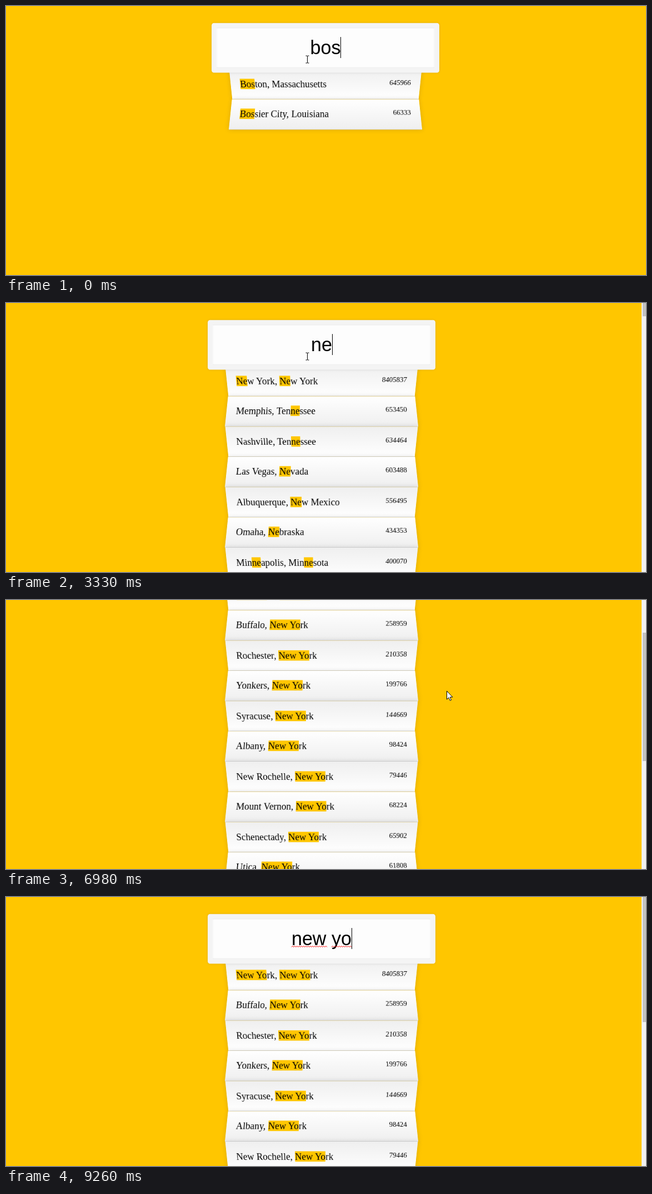
An HTML page for the animation above (9.51 s loop, 1152 px wide and 486 px high).

```html
<!DOCTYPE html>
<html lang="en">
<head>
<meta charset="utf-8">
<title>City search</title>
<style>
  html, body { margin: 0; width: 100%; height: 100%; overflow: hidden; background: #ffc600; }
  #stage { position: relative; width: 1152px; height: 486px; overflow: hidden; }
  #page { position: absolute; left: 0; top: 0; width: 0; transform-origin: 0 0; }
  #box {
    position: absolute; z-index: 2; left: -240px; top: 35.6px; width: 480px; height: 105px;
    box-sizing: border-box; border: 10px solid #f4f4f4; border-radius: 5px; padding: 20px;
    background: #fdfdfd; text-align: center; white-space: pre;
    font: 40px/45px "Liberation Sans", Arial, sans-serif;
    box-shadow: 0 0 5px rgba(0,0,0,.12), inset 0 0 2px rgba(0,0,0,.19);
  }
  #box.empty { color: #757575; }
  ul { position: absolute; left: -200px; top: 130.6px; width: 400px; margin: 0; padding: 0; }
  li {
    display: flex; justify-content: space-between; box-sizing: border-box; height: 64px; padding: 20px;
    border-bottom: 1px solid #d8d8d8; box-shadow: 0 0 10px rgba(0,0,0,.14);
    font: 20px/23px "Liberation Serif", "Times New Roman", serif; color: #000; white-space: nowrap;
  }
  li:nth-child(odd) {
    transform: perspective(100px) rotateX(-3deg) translateY(3px);
    background: linear-gradient(to top, #fff, #efefef);
  }
  li:nth-child(even) {
    transform: perspective(100px) rotateX(3deg) translateY(2px) scale(1.001);
    background: linear-gradient(to bottom, #fff, #efefef);
  }
  li b { font-weight: normal; background: #ffc600; }
  li i { font-style: normal; font-size: 15px; line-height: 17px; }
  #bar { position: absolute; left: 1144px; top: 0; width: 8px; height: 486px; background: #f1f1f1; }
  #thumb { position: absolute; left: 2px; top: 0; width: 6px; background: #c1c1c1; }
  svg { position: absolute; left: 0; top: 0; }
</style>
</head>
<body>
<div id="stage">
  <div id="page">
    <div id="box"><span id="text"></span></div>
    <ul id="list"></ul>
  </div>
  <div id="bar"><div id="thumb"></div></div>
  <svg width="1152" height="486">
    <g id="ink">
      <path id="wave" fill="none" stroke="#f00" stroke-width="1"/>
      <rect id="caret" y="56" width="1" height="38"/>
    </g>
    <path id="beam" fill="none" stroke="#000" d="M-3 -6.5h2.5l.5 .5 .5 -.5h2.5M-3 6.5h2.5l.5 -.5 .5 .5h2.5M0 -6v12"/>
    <path id="arrow" fill="#fff" stroke="#000" d="M0 0V15L3.4 11.8 5.8 17.2 8 16.2 5.7 10.9H10.3Z"/>
  </svg>
</div>
<script>
const LOOP = 9510, SCALE = 0.854;
const $ = id => document.getElementById(id);

const cities = `New York, New York 8405837
Los Angeles, California 3884307
Chicago, Illinois 2718782
Houston, Texas 2195914
Philadelphia, Pennsylvania 1553165
Phoenix, Arizona 1513367
San Antonio, Texas 1409019
San Diego, California 1355896
Columbus, Ohio 822553
Memphis, Tennessee 653450
Washington, District Of Columbia 646449
Boston, Massachusetts 645966
Nashville, Tennessee 634464
Baltimore, Maryland 622104
Las Vegas, Nevada 603488
Albuquerque, New Mexico 556495
Long Beach, California 469428
Virginia Beach, Virginia 448479
Omaha, Nebraska 434353
Minneapolis, Minnesota 400070
New Orleans, Louisiana 378715
Greensboro, North Carolina 279639
Newark, New Jersey 278427
Buffalo, New York 258959
Jersey City, New Jersey 257342
Boise City, Idaho 214237
Rochester, New York 210358
Yonkers, New York 199766
Syracuse, New York 144669
Murfreesboro, Tennessee 117044
Boulder, Colorado 103166
Albany, New York 98424
Hillsboro, Oregon 97368
Boca Raton, Florida 89407
New Rochelle, New York 79446
Mount Vernon, New York 68224
Bossier City, Louisiana 66333
Schenectady, New York 65902
Utica, New York 61808
White Plains, New York 57866
Hempstead, New York 55361
West New York, New Jersey 52122
Troy, New York 49974
Niagara Falls, New York 49722
Binghamton, New York 46444
Freeport, New York 43167
Valley Stream, New York 37659`.split('\n').map(line => line.match(/(.+) (\d+)/).slice(1));

// Each track: [start ms, value...]; a value holds until the next entry.
const typed = [[0, 'bos'], [1990, 'bo'], [2230, 'b'], [2370, ''], [3210, 'n'], [3330, 'ne'],
  [3450, 'new'], [4280, 'new '], [4640, 'new y'], [5160, 'new yo']];
const query = [[0, 'bos'], [2110, 'bo'], [2370, 'b'], [3210, 'n'], [3330, 'ne'], [3450, 'new'],
  [4400, 'new '], [4760, 'new y'], [5310, 'new yo']];
const caret = [[0, 1], [400, 0], [930, 1], [1430, 0], [1990, 1], [3880, 0], [4280, 1],
  [5590, 0], [6180, 1], [6720, 0], [8020, 1], [8830, 0], [9260, 1]];
const misspelt = [[0, 0], [4520, 1], [6180, 2]];
const scroll = [[0, 0], [6840, 70], [6980, 150], [7100, 230], [7220, 306.3], [7340, 370],
  [7460, 410], [7890, 325], [8020, 7], [8170, 0]];
const pointer = [[0, 'beam', 542.5, 96.5], [6330, 'beam', 553.5, 84.5], [6450, 'beam', 571.5, 68.5],
  [6600, 'beam', 650.5, 84.5], [6720, 'arrow', 752.5, 138.5], [6840, 'arrow', 793.5, 164.5],
  [8450, 'arrow', 874.5, 275.5], [8590, 'arrow', 962.5, 364.5], [8710, 'arrow', 1070.5, 473.5], [8830, 'none', 0, 0]];
const thumbEnd = { bo: 100, b: 19, n: 8, ne: 24, new: 74, 'new ': 78, 'new y': 226, 'new yo': 226 };

const at = (track, t) => track.findLast(step => step[0] <= t).slice(1);

let shown;
function fillList(q) {
  if (q === shown) return;
  shown = q;
  const find = new RegExp(q, 'i'), mark = new RegExp(q, 'gi');
  $('list').innerHTML = cities.filter(([name]) => find.test(name)).map(([name, people]) =>
    `<li><span>${name.replace(mark, '<b>$&</b>')}</span><i>${people}</i></li>`).join('');
}

const zigzag = (x, width) => `M${x} 90.5` + 'l2 -2 2 2'.repeat(Math.round(width / 4));

function draw(t) {
  const [word] = at(typed, t), [q] = at(query, t), [y] = at(scroll, t);
  const [bad] = at(misspelt, t), [kind, px, py] = at(pointer, t);
  const hasBar = q in thumbEnd, cx = hasBar ? 568 : 575;

  fillList(q);
  $('page').style.transform = `translate(${cx}px, ${-y}px) scale(${SCALE})`;

  const label = word || 'City or State';
  if ($('text').textContent !== label) $('text').textContent = label;
  $('box').className = word ? '' : 'empty';
  const half = $('text').getBoundingClientRect().width / 2;

  $('ink').setAttribute('transform', `translate(0 ${-y})`);
  $('caret').setAttribute('x', Math.floor(cx + (word ? half : 0)));
  $('caret').setAttribute('opacity', at(caret, t)[0]);
  const left = cx - half;
  $('wave').setAttribute('d', (bad > 0 ? zigzag(left, 62) : '') + (bad > 1 ? zigzag(left + 72, 36) : ''));

  $('bar').style.display = hasBar ? 'block' : 'none';
  $('thumb').style.height = (thumbEnd[q] || 0) + 6 + 'px';
  $('thumb').style.transform = `translateY(${Math.round(y * 0.435) - 6}px)`;

  for (const id of ['beam', 'arrow']) {
    $(id).setAttribute('visibility', id === kind ? 'visible' : 'hidden');
    $(id).setAttribute('transform', `translate(${px} ${py})`);
  }
}

const start = performance.now();
function tick(now) {
  draw(Math.max(0, now - start) % LOOP);
  requestAnimationFrame(tick);
}
draw(0);
requestAnimationFrame(tick);
</script>
</body>
</html>
```
